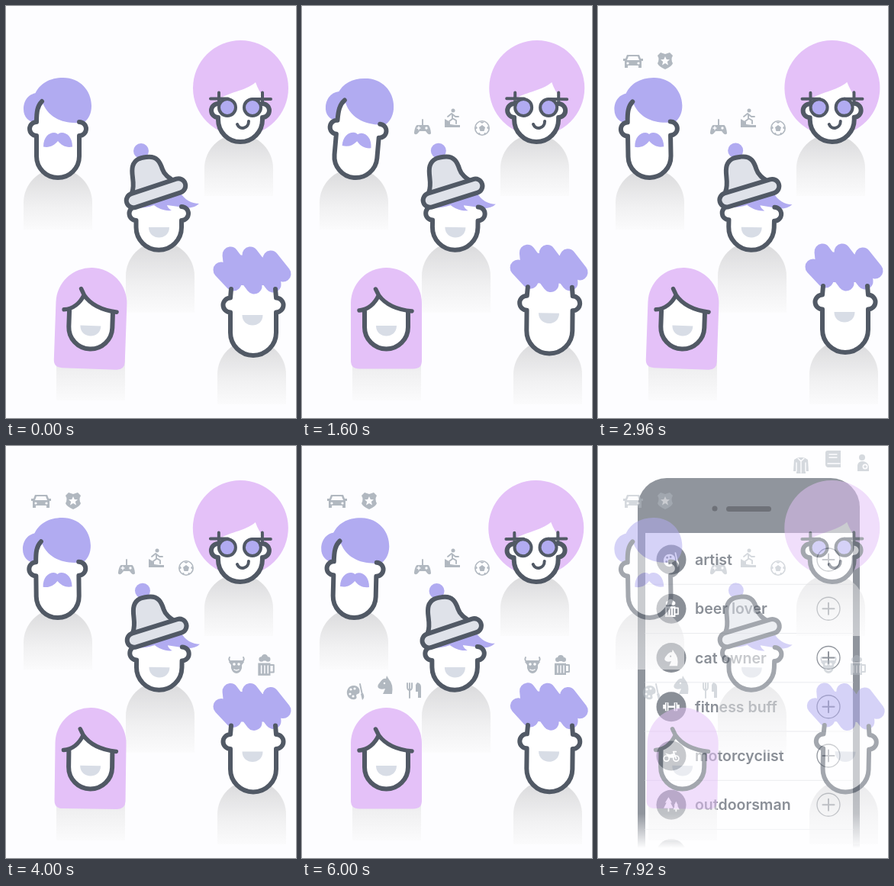
An HTML page with a canvas that plays this animation: 380 px wide and 540 px high, repeating every 8000 ms.

```html
<!DOCTYPE html>
<html lang="en">
<head>
<meta charset="utf-8">
<title>People and interests</title>
<style>
html, body { margin: 0; width: 100%; height: 100%; overflow: hidden; background: #fdfdff; }
canvas { display: block; width: 380px; height: 540px; }
</style>
</head>
<body>
<canvas id="stage" width="380" height="540"></canvas>
<script>
const W = 380, H = 540, LOOP = 8000, STEP = 80;
const BG = '#fdfdff', INK = '#515965', PURPLE = '#b1abf1', PINK = '#e4c1f8',
      GREY = '#dfe2e9', MOUTH = '#d8dde6', ICON = '#b1b8c0';
const stage = document.getElementById('stage').getContext('2d');
const people = layer();
const phone = makePhone();

function layer() {
  const cv = document.createElement('canvas');
  cv.width = W;
  cv.height = H;
  return cv.getContext('2d');
}
function fill(c, d, color) {
  c.fillStyle = color;
  c.fill(new Path2D(d));
}
function line(c, d, width = 6, color = INK) {
  c.strokeStyle = color;
  c.lineWidth = width;
  c.lineCap = c.lineJoin = 'round';
  c.stroke(new Path2D(d));
}
function dot(x, y, r) {
  return `M${x - r} ${y}a${r} ${r} 0 1 0 ${2 * r} 0a${r} ${r} 0 1 0 ${-2 * r} 0z`;
}

// Smooth interpolation through [time, value] keys
function track(keys, t) {
  let i = 1;
  while (i < keys.length - 1 && t > keys[i][0]) i++;
  const [t0, a] = keys[i - 1], [t1, b] = keys[i];
  const x = Math.min(1, Math.max(0, (t - t0) / (t1 - t0)));
  return a + (b - a) * x * x * (3 - 2 * x);
}

// Icon layers: f fill, s stroke, c cut-out, l cut-out line
function icons() {
  return {
    pad: ['sM0 -3V-10', 'fM-7 -3H7C9 -3 11 4 11 8C9 11 6 8 4 5H-4C-6 8 -9 11 -11 8C-11 4 -9 -3 -7 -3Z',
      'lM-7 1h4M-5 -1v4', 'c' + dot(5, 1, 1.7)],
    climb: ['f' + dot(1, -10, 2.5), 'sM-6 -2L-1 -6L4 -2H8M0 -5L0 0L5 3V7M0 1L-4 4',
      'fM-10 1V12H10V9H4L-3 8V5Z'],
    ball: ['f' + dot(0, 0, 10), 'c' + dot(0, 0, 8.4), 'fM0 -4L4 -1L2.5 4H-2.5L-4 -1Z',
      'fM-3 -8H3L0 -6ZM8 -3L9 2L6 0ZM-8 -3L-9 2L-6 0ZM6 7L2 9L3 6ZM-6 7L-2 9L-3 6Z'],
    car: ['fM-8 -8H8L10 -3H13V0H11V9H7V6H-7V9H-11V0H-13V-3H-10Z', 'cM-6 -6H6L8 -1H-8Z',
      'c' + dot(-7, 3, 1.6) + dot(7, 3, 1.6)],
    badge: ['fM-6 -11L0 -9L6 -11L10 -7Q7 -2 10 3Q9 7 0 11Q-9 7 -10 3Q-7 -2 -10 -7Z',
      'cM0 -6L1.8 -2L6 -1.7L2.8 1L4 5.5L0 3L-4 5.5L-2.8 1L-6 -1.7L-1.8 -2Z'],
    bull: ['sM-7 -4Q-11 -6 -9 -10M7 -4Q11 -6 9 -10', 'fM-7 -6H7L10 -4L7 0V4Q5 11 0 11Q-5 11 -7 4V0L-10 -4Z',
      'c' + dot(-3, -1, 1.8) + dot(3, -1, 1.8), 'lM-3 6Q0 8 3 6'],
    beer: ['f' + dot(-5, -8, 3) + dot(-1, -10, 4) + dot(3, -8, 3), 'fM-9 -4H6V12H-9Z',
      'sM6 -1H10V8H6', 'lM-5 0V9M-1 0V9M3 0V9', 'lM-9 -4H7'],
    palette: ['fM-1 -8C-8 -9 -12 -3 -11 3C-10 9 -3 12 1 9C3 7 -1 4 3 3C7 3 7 -7 -1 -8Z',
      'c' + dot(-6, -3, 1.6) + dot(-1, -4, 1.6) + dot(-7, 3, 1.6) + dot(-3, 6, 1.6),
      'sM6 -10L9 4', 'fM7 3L10 2Q13 8 9 11Z'],
    cat: ['fM2 -12L5 -7Q11 -1 9 12H-3Q-1 8 0 5Q-6 7 -9 4Q-11 1 -7 -3Q-3 -9 1 -8Z', 'c' + dot(-1, -2, 1.2)],
    fork: ['sM-8 -9V-4Q-8 0 -5 0M-2 -9V-4Q-2 0 -5 0M-5 -9V10', 'fM5 -10Q10 -9 10 -4V10H6V2H3V-7Z'],
    jacket: ['fM-4 -10H4L9 -7L10 8H6V11H-6V8H-10L-9 -7Z', 'lM-6 -3V8M6 -3V8M0 -6V10M-4 -9L0 -5L4 -9'],
    book: ['fM-7 -11H10V11H-7Q-10 10 -10 7V-8Q-10 -11 -7 -11Z', 'lM-7 6H9M-5 -6H5M-5 -2H5'],
    person: ['f' + dot(-1, -7, 4), 'fM-7 11V3Q-6 -2 0 -2Q7 -1 8 5V11Z', 'c' + dot(3, 5, 3.5), 'f' + dot(3, 5, 1.8)],
    weight: ['fM-9 -6H-4V6H-9ZM4 -6H9V6H4ZM-4 -1.5H4V1.5H-4ZM-12 -3H-9V3H-12ZM9 -3H12V3H9Z', 'lM-6.5 -5V5M6.5 -5V5'],
    bike: ['s' + dot(-7, 4, 4) + dot(7, 4, 4), 'sM7 4L3 -6H7', 'fM-9 -4L-2 -2L5 -4L3 3H-3Z'],
    trees: ['fM-4 -11L1 -3H-1L3 5H-3V10H-5V5H-11L-7 -3H-9Z', 'fM7 -5L10 1H9L12 7H8V10H6V7H3L5 1H4Z']
  };
}

function drawIcon(c, name, x, y, scale, fg, bg) {
  c.save();
  c.translate(x, y);
  c.scale(scale, scale);
  for (const part of icons()[name]) {
    const kind = part[0], d = part.slice(1);
    if (kind === 'f') fill(c, d, fg);
    if (kind === 'c') fill(c, d, bg);
    if (kind === 's') line(c, d, 1.9, fg);
    if (kind === 'l') line(c, d, 1.4, bg);
  }
  c.restore();
}

function makePhone() {
  const c = layer(), dark = '#49515d', deep = '#3f4753';
  c.fillStyle = '#fff';
  c.fillRect(0, 0, W, H);
  fill(c, 'M52 560V80A38 38 0 0 1 90 42H305A38 38 0 0 1 343 80V560Z', dark);
  fill(c, 'M62 114H334V560H62Z', '#fff');
  fill(c, dot(153, 82, 3.5), '#10151f');
  line(c, 'M171.5 82.5H223.5', 7, '#10151f');

  const rows = [['artist', 'palette'], ['beer lover', 'beer'], ['cat owner', 'cat'],
    ['fitness buff', 'weight'], ['motorcyclist', 'bike'], ['outdoorsman', 'trees'], ['', 'pad']];
  c.font = '600 19.5px Inter, "Open Sans", sans-serif';
  rows.forEach(([label, icon], i) => {
    const y = 149 + i * 64.25;
    fill(c, dot(96, y, 19.5), deep);
    drawIcon(c, icon, 96, y, .9, '#fff', deep);
    c.fillStyle = deep;
    c.fillText(label, 127, y + 7);
    if (!label) return;
    line(c, dot(302, y, 15), 1.3, dark);
    line(c, `M294.5 ${y}h15M302 ${y - 7.5}v15`, 2, dark);
    line(c, `M62 ${y + 32.3}H334`, 1, '#dfe1e5');
  });

  const fade = c.createLinearGradient(0, 482, 0, 527);
  fade.addColorStop(0, 'rgba(255,255,255,0)');
  fade.addColorStop(1, '#fff');
  c.fillStyle = fade;
  c.fillRect(0, 482, W, 58);
  return c.canvas;
}

function body(x, top, bottom) {
  const g = people.createLinearGradient(0, top, 0, bottom);
  g.addColorStop(0, '#d9d9db');
  g.addColorStop(.6, '#f0f0f1');
  g.addColorStop(1, '#fbfbfc');
  fill(people, `M${x - 45} ${bottom}V${top + 45}a45 45 0 0 1 90 0V${bottom}Z`, g);
}

// Chin line with both ears, from the left ear's top to the right ear's top
function jaw(xl, xr, ear, r, cy) {
  const half = (xr - xl) / 2;
  return `a${r} ${r} 0 0 0 0 ${2 * r}V${cy}A${half} ${half} 0 0 0 ${xr} ${cy}V${ear + r}a${r} ${r} 0 0 0 0 ${-2 * r}`;
}
function smile(x, y) {
  fill(people, `M${x - 13.5} ${y}h27c0 18 -27 18 -27 0z`, MOUTH);
}

function man() {
  const c = people, shape = jaw(40, 96, 161, 9, 197);
  fill(c, 'M40 152' + shape + 'V130H48Q40 135 40 152Z', '#fff');
  fill(c, 'M47 114C30 112 23 124 23 135C23 146 30 152 39 153Q40 136 52 124Z', PURPLE);
  fill(c, 'M37 118C43 101 58 94 75 94C97 94 112 111 112 131C112 141 108 148 103 152C82 156 55 150 47 124Z', PURPLE);
  line(c, 'M47 125C41 131 40 139 40 152' + shape);
  fill(c, 'M49 184.5C49 172 56 166 63 166Q66 166 68 168Q70 166 73 166C80 166 87 172 87 184.5C79 186 73 183 68 177C63 183 57 186 49 184.5Z', PURPLE);
}

function afro() {
  const c = people, shape = jaw(278, 336, 137, 9, 149);
  fill(c, dot(307.5, 107.5, 62.5), PINK);
  fill(c, 'M278 128' + shape + 'L338 119C333 114 330 108 327 100C313 112 290 113 278 123Z', '#fff');
  line(c, 'M278 128' + shape);
  line(c, 'M279 113.5V126M336 113.5V126M268 121.5H291M323 122H347', 4);
  for (const x of [290, 323]) {
    fill(c, dot(x, 133, 11), PURPLE);
    line(c, dot(x, 133, 11), 4);
  }
  line(c, 'M303 155C306 163 318 161 318 151', 4);
}

function beanie() {
  const c = people, shape = jaw(170.5, 230, 271, 9, 289);
  fill(c, 'M170.5 262' + shape + 'V250L171 257Z', '#fff');
  fill(c, 'M168 262L228 243C234 253 243 258 253 258C247 264 237 265 226 262L211 260Q212 264 217 267C207 268 199 264 194 260Q184 264 168 264Z', PURPLE);
  line(c, 'M170.5 262' + shape);
  smile(200.5, 289);
  fill(c, dot(177, 189, 10), PURPLE);
  const crown = 'M165 244C170 231 163 220 166 209C169 199 177 198 184 197C198 195 202 204 205 213C208 222 217 226 224 231';
  fill(c, crown + 'Z', GREY);
  line(c, crown);
  line(c, 'M167 254L226 234.5', 24.5);
  line(c, 'M167 254L226 234.5', 12.5, GREY);
}

function girl(look) {
  const c = people, px = 96.5 + look * 10, peak = `${px + 4} 379`;
  fill(c, 'M64 465V389.5A46.5 46.5 0 0 1 157 389.5V465Q157 475.5 146 475.5H75Q64 475.5 64 465Z', PINK);
  const xl = 82 + look * 5.5, xr = xl + 57;
  const chin = `V421A28.5 28.5 0 0 0 ${xr} 421V401`;
  fill(c, `M${xl} 398${chin}Q${px + 17} 397 ${peak}Q${px - 3} 394 ${xl} 398Z`, '#fff');
  line(c, `M${xl} 400${chin}`);
  line(c, `M${px - 21.5} 399C${px - 10} 398 ${px - 1} 390 ${peak}Q${px + 17} 397 ${px + 47.5} 400M${peak}L${px} 371`, 5.5);
  smile(110.5 + look * 12.5, 419);
}

function spiky() {
  const c = people, shape = jaw(294, 354, 392, 9.5, 428);
  fill(c, 'M294 372V382.5' + shape + 'V365H294Z', '#fff');
  fill(c, 'M284 344L294 326L320 327L347 331L362 350L345 366H300Z', PURPLE);
  line(c, 'M282 346L298 363L294 326L325 367L320 326L350 365L347 331L363 351', 21, PURPLE);
  line(c, 'M295 371L294 382.5' + shape + 'L353 371');
  smile(323, 405);
}

function head(draw, x, y, angle, dy = 0) {
  people.save();
  people.translate(x, y + dy);
  people.rotate(angle * Math.PI / 180);
  people.translate(-x, -y);
  draw();
  people.restore();
}

const tilt = {
  man: [[0, 0], [450, -1], [950, -.6], [1500, 5], [1750, 5], [2500, 0], [2960, -1], [3700, -1],
    [4900, 1.3], [6050, 1.4], [7280, -.4], [7920, -1]],
  afro: [[0, 0], [1600, .2], [2960, -.5], [4960, .2], [6000, -.6], [7280, -.9], [7920, -.6]],
  beanie: [[0, 0], [1600, .8], [2960, 1.4], [4960, .4], [6000, -.2], [7280, 1.4], [7920, 1.7]],
  girl: [[0, 2], [1600, 0], [2960, 2], [3600, 1.5], [4400, 0], [6000, 0], [7280, -1.3], [7920, 1]],
  spiky: [[0, 0], [1600, .6], [2400, 1.3], [2960, 0], [4960, 0], [6000, .7], [7280, 1.3], [7920, 1.2]]
};
const girlLook = [[4400, 0], [4900, 1], [5350, 1], [5800, 0]];
const spikyRise = [[0, 0], [1600, -2.5], [2960, -4], [4960, -5], [7280, -4.5]];

const groups = [
  [1000, [['pad', 158, 159], ['climb', 197, 147], ['ball', 236, 160]]],
  [2250, [['car', 46, 72], ['badge', 88, 72]]],
  [3700, [['bull', 302, 287], ['beer', 340, 288]]],
  [5100, [['palette', 70, 322], ['cat', 109, 313], ['fork', 146, 320]]],
  [6500, [['jacket', 266, 25], ['book', 308, 17], ['person', 347, 22]]]
];

function pop(x) {
  if (x <= 0) return 0;
  if (x >= 1) return 1;
  return 1 + 2.7 * (x - 1) ** 3 + 1.7 * (x - 1) ** 2;
}

function drawPeople(t) {
  people.clearRect(0, 0, W, H);
  body(68, 213, 293);
  body(305, 168, 249);
  body(202, 309, 402);
  body(322, 438, 522);
  body(111, 425, 517);

  head(man, 68, 225, track(tilt.man, t));
  head(afro, 307, 178, track(tilt.afro, t));
  head(beanie, 200, 319, track(tilt.beanie, t), 1);
  head(() => girl(track(girlLook, t)), 110, 430, track(tilt.girl, t));
  head(spiky, 323, 455, track(tilt.spiky, t), track(spikyRise, t));

  for (const [start, list] of groups) {
    list.forEach(([name, x, y], i) => {
      const s = pop((t - start - i * 150) / 320);
      if (s > 0) drawIcon(people, name, x, y, s, ICON, BG);
    });
  }
}

function draw(t) {
  const mix = Math.max(0, (t - 7680) / 400);
  drawPeople(t);
  stage.globalAlpha = 1;
  stage.fillStyle = BG;
  stage.fillRect(0, 0, W, H);
  stage.globalAlpha = mix;
  stage.drawImage(phone, 0, 0);
  stage.globalAlpha = 1 - .8 * mix;
  stage.drawImage(people.canvas, 0, 0);
}

const begin = performance.now();
function tick() {
  const t = (performance.now() - begin) % LOOP;
  draw(Math.floor(t / STEP) * STEP);
  requestAnimationFrame(tick);
}
tick();
</script>
</body>
</html>
```
